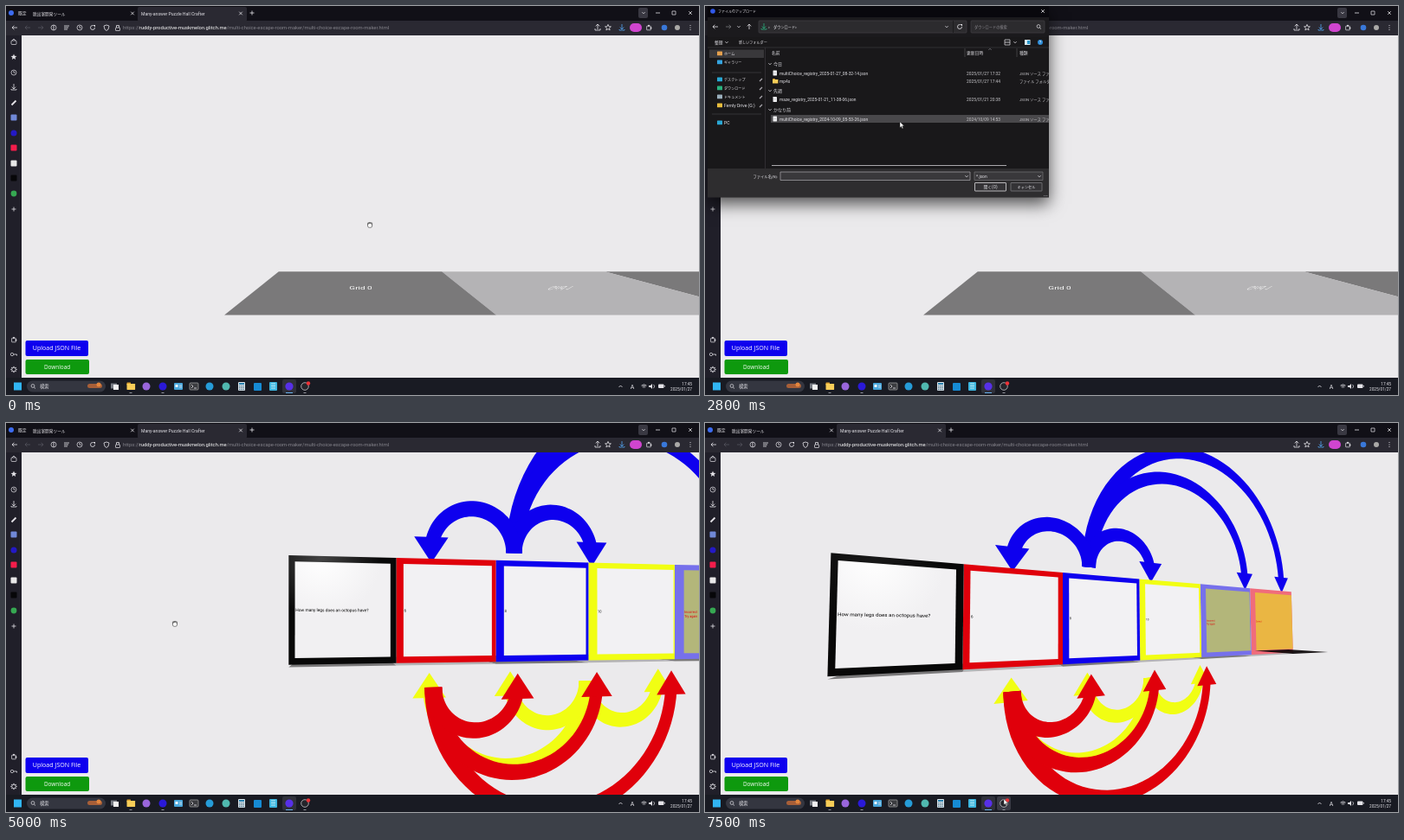
Recreate the animation shown at these times as an HTML page with a canvas. Size 800 by 450 pixels, loop 7600 ms.

```html
<!DOCTYPE html>
<html lang="ja">
<meta charset="utf-8">
<title>Puzzle hall demo</title>
<style>
html,body{margin:0;width:100%;height:100%;overflow:hidden;background:#ebeaec}
canvas{display:block;width:800px;height:450px}
</style>
<canvas id="stage" width="800" height="450"></canvas>
<script>
const g = document.getElementById('stage').getContext('2d');
const LOOP = 7600, FOCAL = 258, SCALE = 325.5;
const RED = '#e0000b', BLUE = '#0e00ee', YELLOW = '#f1fe13', INK = '#e4e3e8', DIM = '#85848c';
const FONT = "Roboto,'Noto Sans CJK JP',sans-serif", BUTTON_FONT = "'Open Sans',sans-serif";
const OPEN = 1900, CLOSE = 3500, LOADED = 3650;

// time, x, z, yaw, pitch
const cameraKeys = [[0,0,.822,0,0],[4250,0,.822,0,0],[4900,0,2.1,.06,0],[5600,-.2367,1.921,.4397,.003],
  [6300,.638,2.281,.3149,.027],[6800,.705,2.297,.3177,.027]];
const pointerKeys = [[0,420,253],[150,420,253],[1200,82,394],[1700,82,394],[2500,222,140],[2800,225,134],
  [3500,225,131],[4150,190,232],[4900,190,232],[5600,276,232],[6300,251,226],[6800,243,225],[7150,245,226],[7450,345,435]];

let cam;

function at(keys, t) {
  let i = keys.length - 1;
  while (i && keys[i][0] > t) i--;
  const a = keys[i], b = keys[i + 1] || a;
  let u = b === a ? 0 : (t - a[0]) / (b[0] - a[0]);
  u = u * u * (3 - 2 * u);
  return a.slice(1).map((v, k) => v + (b[k + 1] - v) * u);
}

function box(x, y, w, h, fill, r = 0, line) {
  g.beginPath();
  g.roundRect(x, y, w, h, r);
  if (fill) { g.fillStyle = fill; g.fill(); }
  if (line) { g.strokeStyle = line; g.lineWidth = .7; g.stroke(); }
}
function dot(x, y, r, fill, line) { box(x - r, y - r, 2 * r, 2 * r, fill, r, line); }
function path(pts) {
  g.beginPath();
  pts.forEach(p => g.lineTo(...p));
}
function poly(pts, fill) { path(pts); g.closePath(); g.fillStyle = fill; g.fill(); }
function line(pts, color = INK, w = .8) { path(pts); g.strokeStyle = color; g.lineWidth = w; g.stroke(); }
function text(s, x, y, size, color = INK, align = 'left', font = FONT) {
  g.font = size + 'px ' + font;
  g.textAlign = align;
  g.fillStyle = color;
  g.fillText(s, x, y);
}
function cross(x, y, r = 1.8) {
  line([[x - r, y - r], [x + r, y + r]]);
  line([[x - r, y + r], [x + r, y - r]]);
}
function plus(x, y) { line([[x - 2.5, y], [x + 2.5, y]]); line([[x, y - 2.5], [x, y + 2.5]]); }
function chevron(x, y, color = INK, r = 1.6, up = 1) { line([[x - r, y - up * r / 2], [x, y + up * r / 2], [x + r, y - up * r / 2]], color); }
function arrowIcon(x, y, angle, color = INK) {
  g.save(); g.translate(x, y); g.rotate(angle);
  line([[-3, 0], [3, 0]], color);
  line([[.6, -2.2], [3, 0], [.6, 2.2]], color);
  g.restore();
}
function clock(x, y) { dot(x, y, 3, null, INK); line([[x, y - 2], [x, y], [x + 1.5, y + .6]]); }
function download(x, y, color = INK) { arrowIcon(x, y - 1, Math.PI / 2, color); line([[x - 3, y + 2], [x - 3, y + 3], [x + 3, y + 3], [x + 3, y + 2]], color); }
function star(x, y, fill) {
  const pts = Array.from({length: 11}, (_, i) => {
    const a = i * Math.PI / 5 - Math.PI / 2, r = i % 2 ? 1.6 : 3.6;
    return [x + r * Math.cos(a), y + r * Math.sin(a)];
  });
  fill ? poly(pts, INK) : line(pts);
}
function puzzle(x, y) { box(x - 2.4, y - 1.8, 4.8, 4.6, null, .5, INK); dot(x, y - 2.3, 1, INK); dot(x + 2.5, y + .5, 1, INK); }
function folder(x, y, k = 1) { box(x - 3 * k, y - 3 * k, 3 * k, 2 * k, '#dca02c', .4); box(x - 3 * k, y - 2 * k, 6.4 * k, 4.6 * k, '#f7cd58', .4); }
function lens(x, y) { dot(x, y - .5, 1.9, null, INK); line([[x + 1.4, y + 1], [x + 3, y + 2.6]]); }

// 3D scene
function proj(x, y, z) {
  const [cx, cz, yaw, pitch] = cam, c = Math.cos(yaw), s = Math.sin(yaw);
  const side = (x - cx) * c + (z - cz) * s, far = (x - cx) * s - (z - cz) * c;
  const k = FOCAL / (far + y * pitch);
  return [409 + side * k, 232 - (y - far * pitch) * k];
}
const upright = (l, r, top, bottom, z) => [proj(l, top, z), proj(r, top, z), proj(r, bottom, z), proj(l, bottom, z)];

function tile(i, color) {
  poly([proj(i - .5, -.4, -.548), proj(i + .5, -.4, -.548), proj(i + .5, -.4, 0), proj(i - .5, -.4, 0)], color);
}

function arrow(from, to, dir, z, color) {
  const mid = (from + to) / 2, r = Math.abs(to - from) / 2, way = Math.sign(from - to);
  const y0 = dir > 0 ? .83 : -.711, outer = [], inner = [];
  for (let i = 0; i <= 48; i++) {
    const u = i / 48, a = u * Math.PI, w = .1 - .02 * u;
    const edge = q => proj(mid + way * q * Math.cos(a), y0 + dir * q * Math.sin(a), z);
    outer.push(edge(r + w));
    inner.unshift(edge(r - w));
  }
  poly(outer.concat(inner), color);
  const base = y0 + dir * .157;
  poly([proj(to - .2, base, z), proj(to + .2, base, z), proj(to, y0 - dir * .136, z)], color);
}

function wallText(s, x, y, size, color) {
  g.font = size + 'px ' + FONT;
  const w = g.measureText(s).width, a = proj(x, y, .029), b = proj(x + w / SCALE, y, .029), d = proj(x, y - 10 / SCALE, .029);
  g.save();
  g.transform((b[0] - a[0]) / w, (b[1] - a[1]) / w, (d[0] - a[0]) / 10, (d[1] - a[1]) / 10, a[0], a[1]);
  text(s, 0, 0, size, color);
  g.restore();
}

const panels = [
  ['#000', '', '#000', 'How many legs does an octopus have?'],
  [RED, '', '#222', '6'], [BLUE, '', '#222', '8'], [YELLOW, '', '#222', '10'],
  ['#7670eb', '#b3b67a', RED, 'Incorrect', 'Try again'],
  ['#f06c7b', '#eab643', RED, 'Correct']
];

// A full-width frame with the face floating slightly in front of it
function panel(i) {
  const [frame, face, ink, ...words] = panels[i];
  const [gx, gy] = proj(i - .2, .6, .029), size = proj(i + .35, .6, .029)[0] - gx;
  const glow = (from, to) => {
    const q = g.createRadialGradient(gx, gy, 0, gx, gy, size);
    q.addColorStop(0, from); q.addColorStop(1, to);
    return q;
  };
  const shade = Math.max(25, 85 - cam[2] * 220);
  poly(upright(i - .5, i + .5, .6258, -.3774, 0), i ? frame : glow(`rgb(${shade},${shade},${shade})`, '#080808'));
  poly(upright(i - .4378, i + .4378, .562, -.312, .029), face || (i ? '#f2f1f3' : glow('#fff', '#f1f0f2')));
  words.forEach((s, k) => wallText(s, i - .432, .11 - k * .045, 12.5, ink));
}

function scene(t) {
  box(18, 34, 782, 396, '#ebeaec');
  g.save();
  g.beginPath(); g.rect(18, 34, 782, 396); g.clip();
  const loaded = t >= LOADED;
  if (loaded) {
    [1, 2, 4].forEach(to => arrow(3, to, -1, -.44, YELLOW));
    [6, 5, 3, 1].forEach(to => arrow(2, to, 1, -.38, BLUE));
    [4, 3, 2].forEach(to => arrow(1, to, -1, -.325, RED));
  }
  for (let i = 5; i >= 0; i--) tile(i, i % 2 ? '#b4b3b5' : '#7a797a');
  if (loaded) {
    panel(5);
    tile(6, '#080405e8');
    for (let i = 4; i >= 0; i--) panel(i);
  } else {
    g.save(); g.translate(409.5, 328.3); g.scale(1, .6);
    text('Grid 0', 0, 0, 10, '#fff', 'center');
    g.restore();
    g.save(); g.transform(1, 0, 1, -.6, 644, 324);
    text('Grid 1', 0, 0, 10, '#eee', 'center');
    g.restore();
  }
  g.restore();
  box(22.5, 387, 72.5, 18, BLUE, 2);
  text('Upload JSON File', 58.5, 398, 7.1, '#fff', 'center', BUTTON_FONT);
  box(22.5, 409, 73.5, 17, '#0e990e', 2);
  text('Download', 59, 420, 6.4, '#fff', 'center', BUTTON_FONT);
}

function browser() {
  box(0, 0, 800, 18, '#111017');
  box(152, 1, 126, 17, '#2a2932', 2);
  box(0, 17, 800, 17, '#2a2932');
  box(0, 34, 18, 396, '#201f29');
  dot(6, 8, 3, '#3d6cf0');
  text('既定', 14, 10, 4.8);
  text('脱出室開発ツール', 31, 10.5, 4.7);
  text('Many-answer Puzzle Hall Crafter', 156, 10.5, 5.1);
  cross(146, 8.5); cross(271, 8.5); plus(284, 8);
  box(730, 2, 11, 12, '#393842', 2); chevron(736, 8);
  line([[750, 8], [755, 8]]); box(769, 6, 4, 4, null, 0, INK); cross(790, 8);

  arrowIcon(10, 25, Math.PI);
  arrowIcon(25, 25, Math.PI, '#55545d'); arrowIcon(40, 25, 0, '#55545d');
  dot(55, 25, 3, null, INK); line([[55, 22], [55, 28]]);
  [23, 25, 27].forEach((y, i) => line([[67, y], [73 - i, y]]));
  clock(85, 25);
  reload(100, 25);
  line([[113, 23], [116, 22], [119, 23], [118, 27], [116, 28.5], [114, 27], [113, 23]]);
  box(126.5, 25, 5, 3.5, null, .5, INK); line([[127.5, 25], [127.5, 22.5], [130.5, 22.5], [130.5, 25]]);
  let x = 135;
  for (const [s, c] of [['https://', DIM], ['ruddy-productive-muskmelon.glitch.me', '#fff'],
    ['/multi-choice-escape-room-maker/multi-choice-escape-room-maker.html', DIM]]) {
    text(s, x, 27.2, 5.82, c);
    x += g.measureText(s).width;
  }
  arrowIcon(683, 24, -Math.PI / 2); line([[680, 26], [680, 28], [686, 28], [686, 26]]);
  star(695, 25); download(711, 25, '#55a8f5');
  box(720, 20, 14, 10, '#d045cf', 5);
  puzzle(742, 25); dot(760, 25, 3.3, '#3978d9'); dot(775, 25, 3, '#aaa9a7');
  [22.5, 25, 27.5].forEach(y => dot(790, y, .6, INK));

  box(6, 40, 6, 4.5, null, 1, INK); line([[7, 40], [9, 38], [11, 40]]);
  star(9, 59, true); clock(9, 77); download(9, 94);
  line([[6.5, 114.5], [11.5, 109.5]], INK, 1.8);
  box(5.5, 125.5, 7, 7, '#7088d7', 1); dot(9, 147, 3.5, '#2419c5');
  box(5.5, 160.5, 7, 7, '#f41d4b', 1); box(5.5, 178.5, 7, 7, '#e8e8e8', 1);
  box(5.5, 195.5, 7, 7, '#070709', 1); dot(9, 217, 3.4, '#36a852');
  plus(9, 235);
  puzzle(9, 386); dot(7, 403, 1.7, null, INK); line([[9, 403], [12.5, 403], [12.5, 404.5]]);
  dot(9, 420.5, 2.2, null, INK);
  for (let a = 0; a < 8; a++) dot(9 + 3 * Math.cos(a * Math.PI / 4), 420.5 + 3 * Math.sin(a * Math.PI / 4), .7, INK);
}

function reload(x, y) {
  g.beginPath(); g.arc(x, y, 2.5, 0, 5); g.strokeStyle = INK; g.lineWidth = .8; g.stroke();
  poly([[x + .5, y - 3], [x + 3, y - 3], [x + 3, y - .5]], INK);
}

function taskbar(px, py) {
  box(0, 430, 800, 20, '#191b23');
  box(9, 435.5, 9, 9, '#31b5f3');
  box(24, 433.5, 91, 13, '#343640', 6.5);
  lens(31, 440); text('検索', 39, 442, 5.3);
  box(94, 437, 17, 5, '#a75f38', 2.5); dot(107, 438, 2.5, '#e3863d');
  box(121, 436.5, 7, 6, '#777b83'); box(124, 438, 6, 6, '#f0f0f0');
  folder(144, 440, 1.5);
  dot(162, 440, 4.5, '#9a66dc'); dot(181, 440, 4.5, '#2a19d8');
  box(194, 436, 10, 8, '#4aa8dd', 1); box(195.5, 438, 3, 3, '#eff7fc'); line([[200, 439], [203, 439]]); line([[200, 441], [203, 441]]);
  box(212, 436, 10, 8, '#3b3c40', 1, '#aaa'); line([[214, 438], [216, 440], [214, 442]]); line([[217, 442], [220, 442]]);
  dot(235, 440, 4.5, '#269cd8'); dot(254, 440, 4.5, '#50b9b0');
  box(268, 435, 8, 10, '#dce6ec', 1); box(269, 436, 6, 2, '#287fac');
  for (let i = 0; i < 9; i++) box(269 + i % 3 * 2.2, 439 + (i / 3 | 0) * 2, 1.4, 1.2, '#52788f');
  box(286, 436, 9, 9, '#168bd4', 1);
  box(304, 435, 9, 10, '#3cb6df', 1); [437, 439.5, 442].forEach(y => line([[306, y], [311, y]], '#e4fbff'));
  box(319, 432, 16, 16, '#30313b', 2); dot(327, 440, 4.6, '#5730e8');
  if (py > 430 && Math.abs(px - 345) < 9) box(337, 432, 16, 16, '#3a3b45', 2);
  dot(345, 440, 4.3, '#24252b', '#d8d8dc'); dot(349, 436.5, 2.2, '#ef3136');
  [144, 181, 345].forEach(x => line([[x - 1.5, 447.5], [x + 1.5, 447.5]], '#92949c', 1));
  line([[323, 447.5], [331, 447.5]], '#68b5f2', 1);
  chevron(709.5, 440, INK, 2, -1);
  text('A', 723, 442.5, 7, INK, 'center');
  g.strokeStyle = INK; g.lineWidth = .8;
  [1.5, 3, 4.5].forEach(r => { g.beginPath(); g.arc(736.5, 442.5, r, -2.3, -.85); g.stroke(); });
  poly([[742, 439], [744, 439], [746, 437], [746, 443], [744, 441], [742, 441]], INK);
  g.beginPath(); g.arc(746, 440, 2.5, -1, 1); g.stroke();
  box(753, 437.5, 6.5, 4.5, INK, 1); box(760, 439, .8, 1.5, INK);
  text('17:45', 792, 438.5, 4.7, INK, 'right'); text('2025/01/27', 792, 445.3, 4.7, INK, 'right');
}

function dialog(px, py) {
  g.save();
  g.shadowColor = '#000a'; g.shadowBlur = 18; g.shadowOffsetY = 7;
  box(3, 0, 394, 221.5, '#2e2d2f');
  g.restore();
  box(3, 0, 394, 13, '#09080d');
  box(3, 13, 394, 23, '#1b1a1d');
  box(3, 36, 394, 152, '#19181a');
  dot(9, 6, 2.8, '#3159ea');
  text('ファイルのアップロード', 15, 8, 4); cross(390, 6);
  arrowIcon(12, 24, Math.PI); arrowIcon(27, 24, 0, '#77767a'); chevron(39, 24); arrowIcon(51, 24, -Math.PI / 2);
  box(62, 17, 240, 14, '#2c2b2e', 1, '#424145'); line([[286.5, 17], [286.5, 31]], '#19181a');
  download(68, 24, '#29b27e'); text('›', 73, 26, 6); text('ダウンロード', 79, 26, 4.2); text('›', 104, 26, 6);
  chevron(279, 24); reload(294, 24);
  box(307, 17, 85, 14, '#2c2b2e', 1, '#424145'); text('ダウンロードの検索', 311, 26, 4.2, '#8c8a90'); lens(385, 24);
  text('整理', 11, 44, 4.8); chevron(25, 42); text('新しいフォルダー', 39, 44, 4.1);
  box(346, 39, 6, 6, null, 0, INK); line([[346, 42], [352, 42]]); chevron(358, 42);
  box(369, 39, 6.5, 6, '#d6e9f2'); box(372, 40, 3, 4, '#2795ca');
  dot(387, 42, 3, '#2c8cd7'); text('?', 387, 44, 5, '#fff', 'center');
  line([[3, 48], [397, 48]], '#363539'); line([[69.5, 48], [69.5, 188]], '#363539');

  box(5, 50.5, 63, 9.5, '#39383b');
  const places = [['ホーム', 57, '#e5a04d'], ['ギャラリー', 67, '#35a4df'], ['デスクトップ', 87, '#28a8d4'], ['ダウンロード', 97, '#29b27e'],
    ['ドキュメント', 107, '#9aafbd'], ['Fernly Drive (G:)', 117, '#e8bd3d'], ['PC', 137, '#2aa7d4']];
  places.forEach(([s, y, c], i) => {
    box(14, y - 4.5, 6, 4.8, c, .6);
    text(s, 22, y, i > 4 ? 5.1 : 4.1);
    if (i > 1 && i < 6) line([[63, y], [66, y - 3]], '#a7a5ac', 1.2);
  });
  line([[8, 77], [65, 77]], '#3b3a3d'); line([[8, 125], [65, 125]], '#3b3a3d');

  text('名前', 77, 56, 4.8); text('更新日時', 302, 56, 4.8); text('種類', 363, 56, 4.8);
  [300, 360].forEach(x => line([[x, 49], [x, 59]], '#4a494d')); chevron(329, 50, DIM, 1.5, -1);
  [['今日', 69], ['先週', 100], ['かなり前', 122]].forEach(([s, y]) => { chevron(75, y - 2); text(s, 79, y, 5); });
  g.save();
  g.beginPath(); g.rect(70, 48, 327, 140); g.clip();
  [['multiChoice_registry_2025-01-27_08-32-14.json', '2025/01/27 17:32', 79.5], ['mp4s', '2025/01/27 17:44', 88.5],
    ['maze_registry_2025-01-21_11-38-06.json', '2025/01/21 20:38', 110], ['multiChoice_registry_2024-10-09_05-53-26.json', '2024/10/09 14:53', 132.5]
  ].forEach(([name, date, y], i) => {
    if (px > 76 && px < 397 && Math.abs(py - y + 2) < 5) box(76, y - 6.5, 321, 9, '#49484b');
    if (i === 1) folder(81, y - 1.5); else { box(78.5, y - 5, 4.5, 6, '#eeeef0', .4); line([[79.5, y - 2], [82, y - 2]], '#aaa', .5); }
    text(name, 86, y, 4.85);
    text(date, 302, y, 4.85, '#c8c7cb');
    text(i === 1 ? 'ファイル フォルダー' : 'JSON ソース ファイル', 363, y, 4.3, '#c8c7cb');
  });
  g.restore();
  line([[77, 184.5], [348, 184.5]], '#aaa8ac', 1);
  text('ファイル名(N):', 84, 198.5, 4.3, INK, 'right');
  box(87, 192, 219, 9.5, '#39383b', 0, '#a9a8ac'); chevron(302, 197);
  box(311, 192, 79, 9.5, '#39383b', 0, '#747378'); text('*.json', 313, 198.5, 4.9); chevron(386, 197);
  box(311.5, 204.5, 36, 9.5, '#343336', .5, '#f2f1f4'); text('開く(O)', 329.5, 211, 4.8, INK, 'center');
  box(353, 204.5, 36, 9.5, '#343336', .5, '#858489'); text('キャンセル', 371, 211, 4.2, INK, 'center');
  for (let i = 0; i < 3; i++) dot(395 - i * 1.7, 219.5, .5, '#99989c');
}

function pointer(x, y, hand) {
  g.save(); g.translate(x, y);
  if (hand) {
    box(-2.4, -1.5, 5, 4.6, '#fff', 1.6, '#333');
    for (let i = 0; i < 4; i++) box(-2.4 + i * 1.25, -2.7 + Math.abs(i - 1.5) * .3, 1.25, 2.5, '#fff', .6, '#333');
    box(-1.8, -1, 3.8, 3.4, '#fff', 1);
  } else {
    const shape = [[0, 0], [0, 6.8], [1.6, 5.3], [2.7, 7.7], [3.8, 7.2], [2.7, 4.8], [4.9, 4.8]];
    poly(shape, '#fff');
    line([...shape, shape[0]], '#222', .4);
  }
  g.restore();
}

function frame() {
  const t = (performance.now() - start) % LOOP, [px, py] = at(pointerKeys, t), open = t >= OPEN && t < CLOSE;
  cam = at(cameraKeys, t);
  scene(t);
  browser();
  taskbar(px, py);
  if (open) dialog(px, py);
  pointer(px, py, !open && py < 430 && !(px < 96 && py > 386));
  requestAnimationFrame(frame);
}
const start = performance.now();
frame();
</script>
</html>
```
